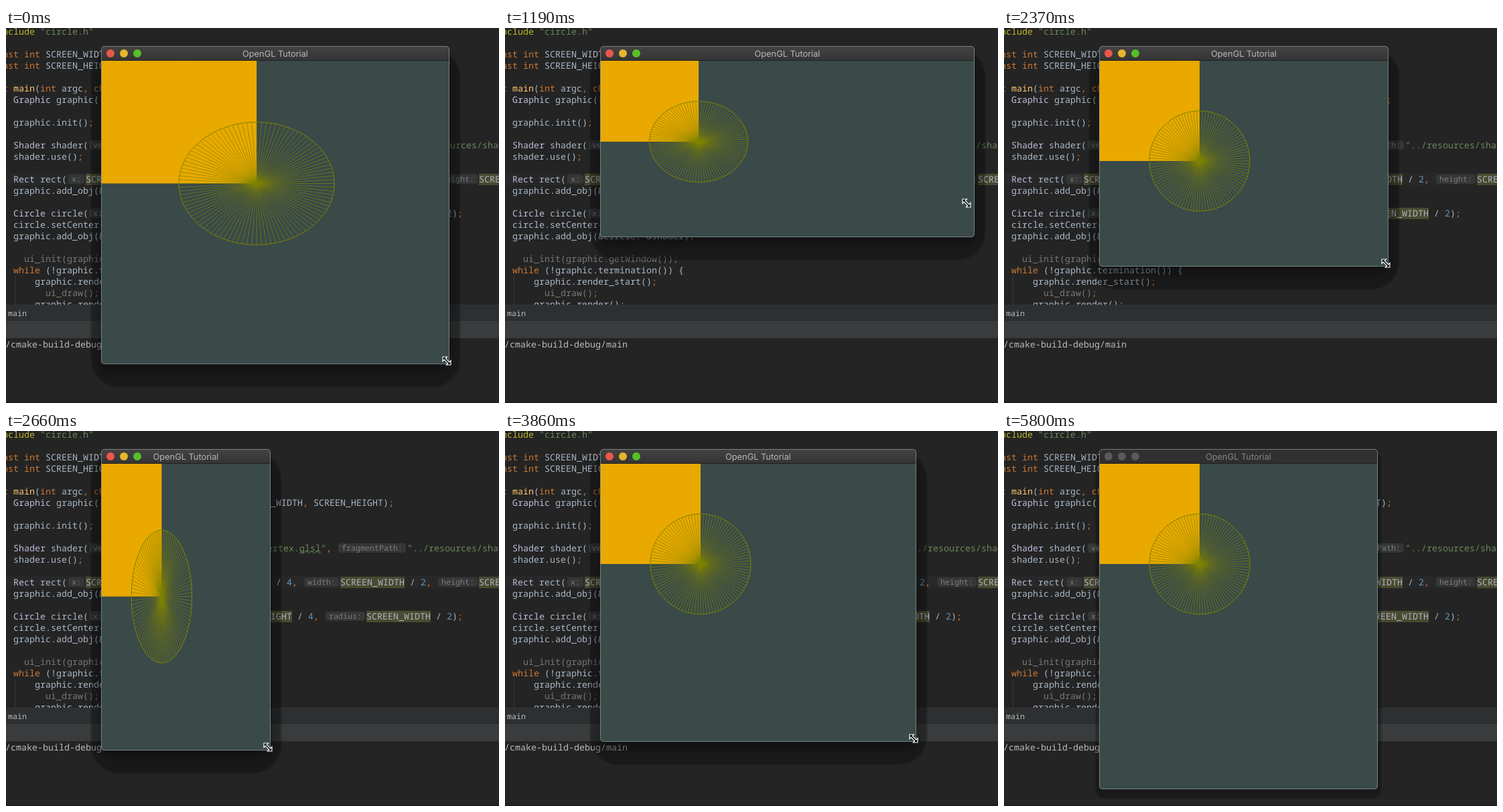
Write an HTML page that moves like this. It is 736 by 561 pixels and loops after 5900 ms.

```html
<!DOCTYPE html>
<html lang="en">
<head>
<meta charset="utf-8">
<title>Window resize</title>
<style>
  html, body { margin: 0; width: 100%; height: 100%; overflow: hidden; background: #242424; }
  svg { display: block; }
  text { white-space: pre; text-rendering: geometricPrecision; }
  .code { font: 13.333px "Noto Sans Mono", "DejaVu Sans Mono", monospace; fill: #a9b7c6; }
  .hint { font: 11.667px "Noto Sans Mono", "DejaVu Sans Mono", monospace; fill: #7c7c7c; }
  .title { font: 12.8px Inter, Roboto, sans-serif; fill: #b9b8b8; text-anchor: middle; }
  .inactive .title { fill: #858384; }
  .inactive .light { fill: #5b595a; }
  .inactive #bar { fill: #312f30; }
  .inactive #glow { display: none; }
  #fan path { fill: none; stroke: #7e8300; vector-effect: non-scaling-stroke; }
</style>
</head>
<body>
<svg id="stage" width="736" height="561" viewBox="0 0 736 561">
  <defs>
    <linearGradient id="barFill" x2="0" y2="1">
      <stop stop-color="#444242"/><stop offset="1" stop-color="#353434"/>
    </linearGradient>
    <filter id="edge" x="-20%" y="-20%" width="140%" height="140%"><feGaussianBlur stdDeviation="1.2"/></filter>
    <filter id="soft" x="-20%" y="-20%" width="140%" height="140%"><feGaussianBlur stdDeviation="7"/></filter>
    <clipPath id="clip"><rect id="clipBox" x="142" y="27" rx="5"/></clipPath>
  </defs>
  <rect width="736" height="561" fill="#242424"/>
  <rect y="217" width="736" height="18" fill="#282829"/>
  <path d="M13.5 371V414" stroke="#393939"/>
  <g id="code"></g>
  <rect y="414" width="736" height="147" fill="#242424"/>
  <rect y="414" width="736" height="24" fill="#2d2f31"/>
  <rect y="414" width="736" height="1" fill="#333537"/>
  <rect y="438" width="736" height="26" fill="#393b3c"/>
  <rect y="437" width="736" height="1" fill="#292a2b"/>
  <rect y="559.5" width="736" height="1.5" fill="#191919"/>
  <text class="hint" x="3" y="431" style="fill:#bbb">main</text>
  <text class="code" x="-1" y="478" style="fill:#bbb">/cmake-build-debug/main</text>

  <g id="window">
    <rect id="shade" filter="url(#edge)" opacity=".3"/>
    <rect id="glow" filter="url(#soft)" opacity=".3"/>
    <g clip-path="url(#clip)">
      <rect id="bar" x="142" y="27" height="22" fill="url(#barFill)"/>
      <rect id="barLine" x="142" y="48" height="1" fill="#1f1f1f"/>
      <circle class="light" cx="156" cy="38" r="6" fill="#ea574c"/>
      <circle class="light" cx="176" cy="38" r="6" fill="#e6b62c"/>
      <circle class="light" cx="196" cy="38" r="6" fill="#56c027"/>
      <text class="title" id="caption" y="42.7">OpenGL Tutorial</text>
      <rect id="body" x="142" y="49" fill="#394a49"/>
      <rect id="gap" x="589" y="230" width="19" height="19" fill="#111" opacity=".8"/>
      <g id="scene">
        <rect id="clear" fill="#394a49"/>
        <rect width="150" height="150" fill="#e9a900"/>
        <g id="fan"></g>
      </g>
    </g>
    <rect id="frame" x="142.5" y="27.5" rx="4.5" fill="none" stroke="#8b9492" stroke-opacity=".75"/>
  </g>
  <path id="cursor" d="M-6-6H.5L-1.8-3.8 3.8 1.8 6-.5V6H-.5L1.8 3.8-3.8-1.8-6 .5Z" stroke="#fff" stroke-width="1.2"/>
</svg>
<script>
const $ = id => document.getElementById(id);
const set = (el, attrs) => { for (const k in attrs) el.setAttribute(k, attrs[k]); };
function add(parent, tag, attrs, text) {
  const el = document.createElementNS("http://www.w3.org/2000/svg", tag);
  set(el, attrs);
  if (text) el.textContent = text;
  parent.append(el);
}

// Code listing: "~name:~" marks a parameter hint.
const lines = [
  '#include "circle.h"', '',
  'const int SCREEN_WIDTH = 600;', 'const int SCREEN_HEIGHT = 600;', '',
  'int main(int argc, char **argv) {',
  '    Graphic graphic(~title:~"OpenGL Tutorial", SCREEN_WIDTH, SCREEN_HEIGHT);', '',
  '    graphic.init();', '',
  '    Shader shader(~vertexPath:~"../resources/shader/vertex.glsl", ~fragmentPath:~"../resources/shader/',
  '    shader.use();', '',
  '    Rect rect(~x:~SCREEN_WIDTH / 4, ~y:~SCREEN_HEIGHT / 4, ~width:~SCREEN_WIDTH / 2, ~height:~SCREEN_HEIGHT',
  '    graphic.add_obj(&rect, &shader);', '',
  '    Circle circle(~x:~SCREEN_WIDTH / 4, ~y:~SCREEN_HEIGHT / 4, ~radius:~SCREEN_WIDTH / 2);',
  '    circle.setCenter(true);',
  '    graphic.add_obj(&circle, &shader);', '',
  '      ui_init(graphic.getWindow());',
  '    while (!graphic.termination()) {',
  '        graphic.render_start();',
  '          ui_draw();',
  '        graphic.render();'
];
const palette = [
  [/^(const|int|char|while|true|[,;])$/, '#cc7832'],
  [/^(#|include)$/, '#bbb529'],
  [/^"/, '#6a8759'],
  [/^\d/, '#6897bb'],
  [/^(Graphic|Shader|Rect|Circle)$/, '#b9bcd9'],
  [/^main$/, '#ffc66d']
];
const code = $('code');
lines.forEach((line, row) => {
  const y = 10 + 17 * row;
  const dim = /^ +ui_/.test(line);
  const marked = /Rect|Circle /.test(line);
  let x = -21;
  for (const token of line.match(/~[^~]+~|"[^"]*"?|\w+|\s+|[,;]|[^\w\s,;"~]+/g) || []) {
    if (token[0] === '~') {
      const name = token.slice(1, -1), w = 7 * name.length;
      add(code, 'rect', { x: x + 2, y: y - 12, width: w + 10, height: 14, rx: 4, fill: '#353636' });
      add(code, 'text', { class: 'hint', x: x + 7, y: y - 1 }, name);
      x += w + 14;
      continue;
    }
    const w = 8 * token.length;
    if (marked && /^SCREEN/.test(token))
      add(code, 'rect', { x, y: y - 13, width: w, height: 17, fill: '#4a4a30' });
    const hit = palette.find(([re]) => re.test(token));
    if (token.trim())
      add(code, 'text', { class: 'code', x, y, style: 'fill:' + (dim ? '#777' : hit ? hit[1] : '#a9b7c6') }, token);
    x += w;
  }
});
const wave = 'M438 181.5' + 'q2-3 4 0t4 0'.repeat(4);
add(code, 'path', { d: wave, fill: 'none', stroke: '#5b8a55', 'stroke-width': .9 });

// Circle fan: 100 spokes and a rim around (150, 150).
let spokes = '', rim = '';
for (let i = 0; i < 100; i++) {
  const a = i * Math.PI / 50;
  const p = `${(150 + 75 * Math.cos(a)).toFixed(2)} ${(150 + 75 * Math.sin(a)).toFixed(2)}`;
  spokes += `M150 150L${p}`;
  rim += (i ? 'L' : 'M') + p;
}
add($('fan'), 'path', { d: spokes, 'stroke-width': .7 });
add($('fan'), 'path', { d: rim + 'Z', 'stroke-width': 1 });

// [time, right, bottom, cursor x, cursor y]; the scene is the previous size stretched to the new one.
const steps = [
  [0, 662, 503], [140, 662, 503], [440, 690, 455], [590, 712, 376], [740, 712, 376],
  [1190, 701, 313, 689, 262], [1340, 679, 229], [1480, 679, 229],
  [1930, 608, 315, 570, 352], [2080, 574, 357], [2230, 574, 357], [2380, 562, 373], [2510, 562, 373],
  [2660, 395, 478], [2810, 395, 478], [3110, 326, 497], [3260, 326, 497],
  [3560, 500, 478], [3710, 614, 465], [3860, 614, 465],
  [4460, 585, 505], [4610, 558, 536], [4760, 558, 536],
  [5210, 558, 536, 612, 552], [5360, 558, 536, 800, 600], [5800, 558, 536, 800, 600]
];
const LOOP = 5900, LEFT = 142, TOP = 27, BAR = 49;

function draw(i) {
  const [time, right, bottom, cx = right - 4, cy = bottom - 5] = steps[i];
  const [, oldRight, oldBottom] = i ? steps[i - 1] : [0, 478, 420];
  const w = right - LEFT, h = bottom - TOP;
  const oldW = oldRight - LEFT, oldH = oldBottom - BAR;
  const torn = time === 1930, idle = time === 5800;
  const sceneTop = torn ? TOP : BAR;
  const sx = (torn ? 447 : w) / oldW, sy = (bottom - sceneTop) / oldH;

  $('window').setAttribute('class', idle ? 'inactive' : '');
  set($('clipBox'), { width: w, height: h });
  set($('frame'), { width: w - 1, height: h - 1 });
  set($('bar'), { width: w });
  set($('barLine'), { width: w });
  set($('body'), { width: w, height: torn ? oldH : bottom - BAR });
  set($('clear'), { width: oldW, height: oldH });
  set($('scene'), { transform: `translate(${LEFT} ${sceneTop}) scale(${sx} ${sy})` });
  set($('caption'), { x: Math.max(LEFT + w / 2, 260) });
  set($('gap'), { visibility: torn ? 'visible' : 'hidden' });
  set($('shade'), idle
    ? { x: LEFT - 5, y: TOP + 5, width: w + 10, height: h + 8, rx: 12 }
    : { x: LEFT - 15, y: TOP + 4, width: w + 31, height: h + 30, rx: 42 });
  set($('glow'), { x: LEFT, y: TOP + 16, width: w, height: h - 6, rx: 14 });
  set($('cursor'), { transform: `translate(${cx} ${cy})` });
}

let shown = -1;
function tick() {
  const t = performance.now() % LOOP;
  let i = steps.length - 1;
  while (steps[i][0] > t) i--;
  if (i !== shown) draw(shown = i);
  requestAnimationFrame(tick);
}
tick();
</script>
</body>
</html>
```
